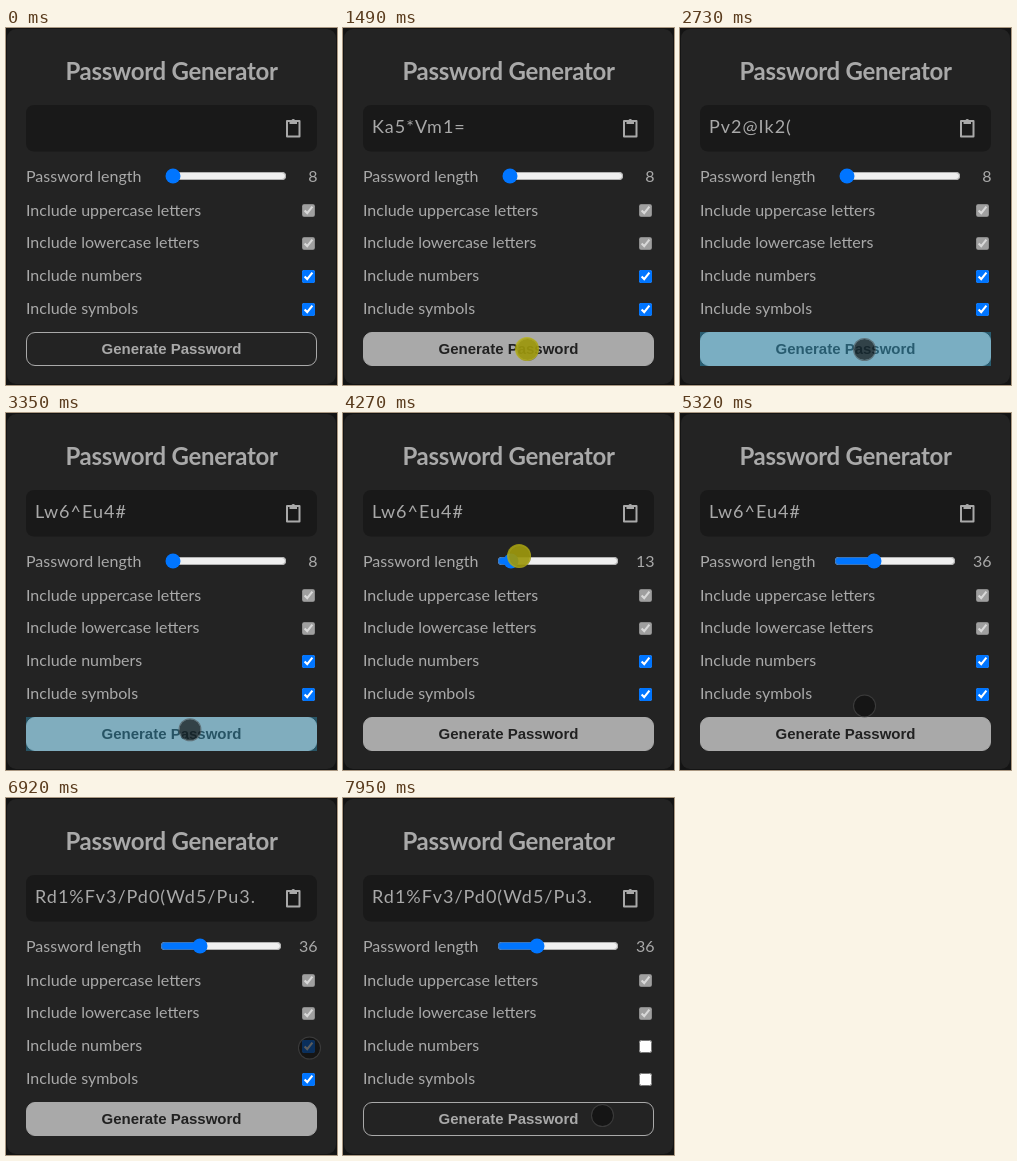
Write an HTML page that moves like this. It is 331 px wide and 357 px high and loops after 8 s.

```html
<!DOCTYPE html>
<html lang="en">
<head>
<meta charset="utf-8">
<title>Password Generator</title>
<style>
  html, body { margin: 0; width: 100%; height: 100%; overflow: hidden; background: #141414; }
  body { position: relative; }
  svg { position: absolute; left: 0; top: 0; }
  text { font: 16px Lato, sans-serif; fill: #a9a9a9; }
  .title { font-size: 24px; font-weight: 700; letter-spacing: -.3px; }
  .password { font-size: 18px; letter-spacing: 1px; }
  .label { font: bold 15px "Liberation Sans", Arial, sans-serif; }
  input { position: absolute; margin: 0; pointer-events: none; }
  input[type=checkbox] { left: 296px; width: 13px; height: 13px; }
  #range { top: 140px; width: 122px; height: 16px; }
  #touch, #press { position: absolute; left: 0; top: 0; border-radius: 50%; box-sizing: border-box; }
  #touch { width: 23px; height: 23px; margin: -11.5px; border: 1.5px solid rgba(75, 75, 75, .6);
    background: rgba(15, 15, 15, .68); background-clip: padding-box; }
  #press { width: 24px; height: 24px; margin: -12px; background: rgba(186, 180, 12, .76); }
</style>
</head>
<body>
<svg width="331" height="357" viewBox="0 0 331 357">
  <rect x="1" y="1" width="329" height="355" rx="9" fill="#232323"/>
  <text class="title" x="165.5" y="52" text-anchor="middle">Password Generator</text>
  <rect x="20" y="77" width="291" height="46.5" rx="8" fill="#191919"/>
  <clipPath id="field"><rect x="29" y="85" width="219" height="32"/></clipPath>
  <text id="password" class="password" x="29" y="105" clip-path="url(#field)"></text>
  <path d="M281 93h12.5v15.5h-12.5z" fill="none" stroke="#a9a9a9" stroke-width="2" stroke-linejoin="round"/>
  <path d="M283.5 92h2a2 2 0 0 1 3.5 0h2v4h-7.500z" fill="#a9a9a9"/>
  <text x="20" y="154">Password length</text>
  <text id="count" x="311.500" y="154" text-anchor="end"></text>
  <text x="20" y="188">Include uppercase letters</text>
  <text x="20" y="220">Include lowercase letters</text>
  <text x="20" y="253">Include numbers</text>
  <text x="20" y="286">Include symbols</text>
  <rect id="button" x="20.500" y="304.500" width="290" height="33" rx="8.500" stroke="#a9a9a9"/>
  <text id="label" class="label" x="165.500" y="326" text-anchor="middle">Generate Password</text>
  <rect id="tap" x="20" y="304" width="291" height="34" fill="rgb(51,181,229)"/>
</svg>
<input id="range" type="range" min="8" max="100" value="8">
<input type="checkbox" checked disabled style="top:176px">
<input type="checkbox" checked disabled style="top:209px">
<input id="numbers" type="checkbox" checked style="top:242px">
<input id="symbols" type="checkbox" checked style="top:275px">
<div id="touch"></div>
<div id="press"></div>
<script>
const LOOP = 8000;
const $ = id => document.getElementById(id);

// [time, x, y]
const path = [
  [640, 181, 347], [870, 184, 321], [3340, 184, 321], [3650, 170, 187],
  [3890, 166.5, 153.5], [3960, 166.5, 153.5], [4040, 172, 145], [4270, 176, 143],
  [4680, 195, 144.5], [4770, 195, 145], [5020, 188, 210], [5400, 183, 314],
  [6600, 183, 314], [6920, 303, 249.5], [7400, 303, 249.5], [7560, 301, 281],
  [7720, 301, 281], [7950, 259, 317], [8000, 259, 317]
];

// [press, release]
const clicks = [
  [1100, 1180], [1430, 1640], [1950, 2180], [2410, 2640], [2880, 3110],
  [4040, 4760], [5560, 5720], [5870, 6040], [6270, 6420], [7060, 7150], [7600, 7700]
];

// [release on the button, generated text]
const passwords = [
  [1180, "Ka5*Vm1="], [1640, "Rt3$Bv0%"], [2180, "Gn8+Tc4!"], [2640, "Pv2@Ik2("],
  [3110, "Lw6^Eu4#"], [5720, "Mx4&Jr9?Ts2+Bk8=Vh3!Zn6@"],
  [6040, "Hb5/Yc6*Fd1}Nw9.Qg7%Ka2&"], [6420, "Rd1%Fv3/Pd0(Wd5/Pu3.Hm8="]
];

const clamp = v => Math.min(1, Math.max(0, v));

function pointAt(t) {
  const i = path.findIndex(p => p[0] > t);
  const a = path[i - 1], b = path[i];
  const k = (t - a[0]) / (b[0] - a[0]);
  return [a[1] + (b[1] - a[1]) * k, a[2] + (b[2] - a[2]) * k];
}

// Tap flash: quick rise, hold, quick fade.
const flash = age => clamp((age + 30) / 80) * clamp((310 - age) / 80);

function draw(t) {
  const last = passwords.filter(p => p[0] <= t).pop();
  $("password").textContent = last ? last[1] : "";
  $("tap").style.opacity = last ? .4 * flash(t - last[0]) : 0;

  const lit = t >= 1180 && t < 7150;
  $("button").setAttribute("fill", lit ? "#a9a9a9" : "#232323");
  $("label").style.fill = lit ? "#212121" : "#a9a9a9";

  const length = t < 4270 ? 8 : Math.round(13 + 23 * clamp((t - 4270) / 410));
  $("range").value = length;
  $("range").style.left = (length > 9 ? 154 : 158.5) + "px";
  $("count").textContent = length;

  $("numbers").checked = t < 7150;
  $("symbols").checked = t < 7700;

  const shown = t >= 640;
  const down = clicks.some(c => t >= c[0] && t < c[1]);
  $("touch").hidden = !shown;
  $("press").hidden = !down;
  if (shown) {
    const [x, y] = pointAt(t);
    for (const id of ["touch", "press"]) $(id).style.transform = `translate(${x}px, ${y}px)`;
  }
}

function tick() {
  draw(performance.now() % LOOP);
  requestAnimationFrame(tick);
}
tick();
</script>
</body>
</html>
```
